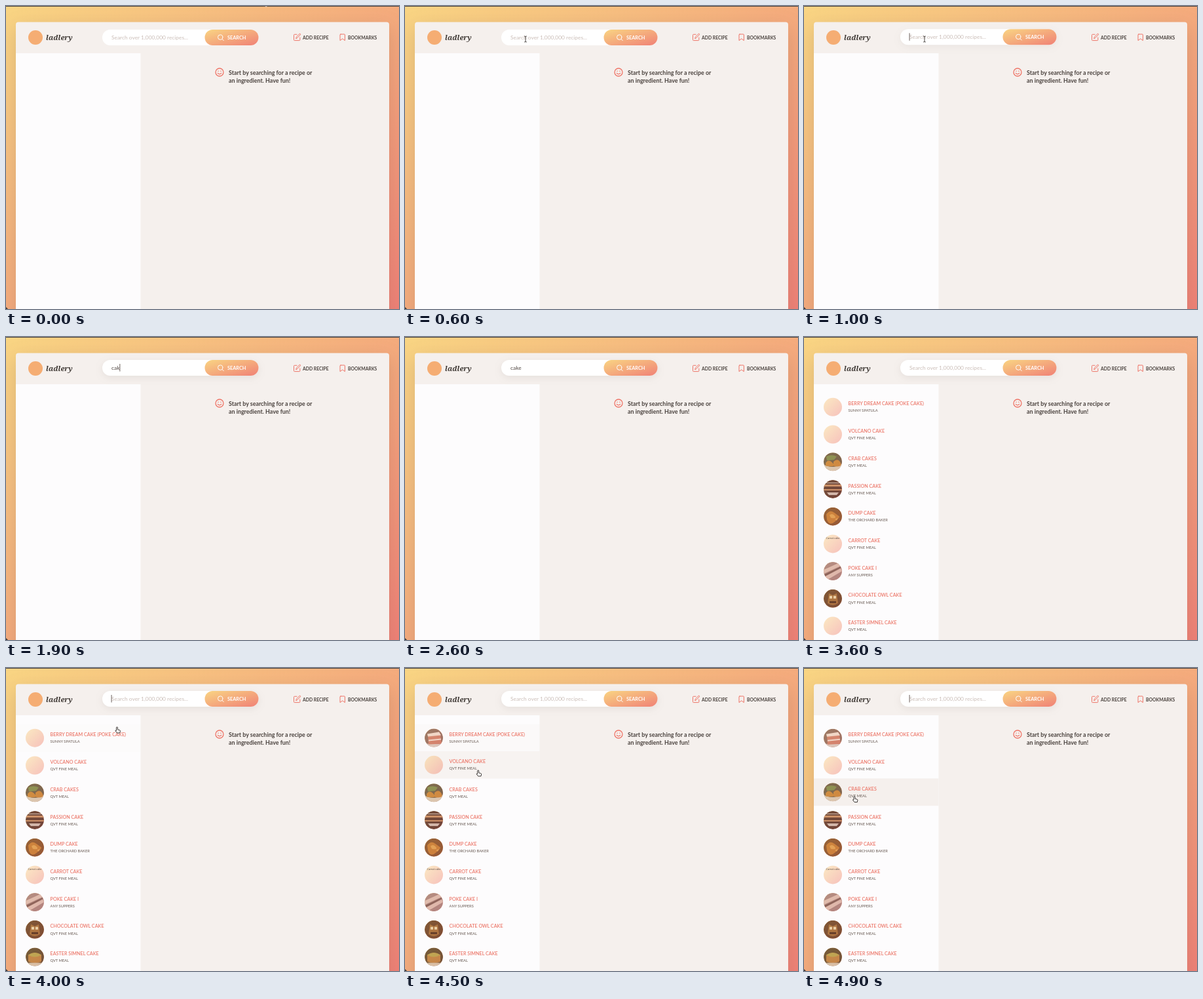
Write an HTML page that moves like this. It is 600 by 462 pixels and loops after 5000 ms.

```html
<!DOCTYPE html>
<html lang="en">
<head>
<meta charset="utf-8">
<title>Recipe search</title>
<style>
  html, body { margin: 0; width: 100%; height: 100%; overflow: hidden; }
  svg { display: block; font-family: Lato, sans-serif; }
  .card { filter: drop-shadow(0 9px 14px rgba(97, 85, 81, .2)); }
  .brand { font: italic bold 11px "Noto Serif", serif; fill: #3f3935; }
  .nav { font-size: 6.85px; font-weight: 700; fill: #4a423e; }
  .message { font-size: 8.9px; font-weight: 700; fill: #4a423e; }
  .input { font-size: 8.38px; }
  .button { font-size: 7.35px; font-weight: 700; fill: #fff; }
  .title { font-size: 7.2px; font-weight: 600; fill: #ec786a; }
  .publisher { font-size: 5.7px; font-weight: 600; fill: #7d716b; }
  .alt { font-size: 4.2px; fill: #5b4c45; text-anchor: middle; }
  .icon { fill: none; stroke: #ee7568; stroke-linecap: round; stroke-linejoin: round; }
</style>
</head>
<body>
<svg width="600" height="462" viewBox="0 0 600 462">
  <defs>
    <linearGradient id="warm" x2="1" y2="1">
      <stop stop-color="#f9d583"/><stop offset="1" stop-color="#f08176"/>
    </linearGradient>
    <clipPath id="round"><circle r="14"/></clipPath>
  </defs>

  <rect width="600" height="462" fill="url(#warm)"/>
  <rect class="card" x="15" y="24.5" width="570" height="500" rx="4" fill="#f5f0ed"/>
  <rect x="15" y="72" width="190.5" height="390" fill="#fdfcfd"/>
  <rect width="600" height="1" fill="#4b4541"/>
  <path d="M0 459v3h3z" fill="#3a3431"/>

  <circle cx="45" cy="48" r="11" fill="#f5ad73"/>
  <text class="brand" x="61" y="51.5">ladlery</text>

  <g id="search">
    <rect x="147" y="36" width="238.5" height="24" rx="12" fill="#fff"/>
    <text id="query" class="input" x="161" y="51"></text>
    <rect id="caret" y="42" width=".9" height="11.5" fill="#5c4f4a"/>
    <rect x="303.5" y="36" width="82" height="24" rx="12" fill="url(#warm)"/>
    <path class="icon" style="stroke:#fff" d="M330.9 47.6a3.7 3.7 0 1 1-7.4 0a3.7 3.7 0 1 1 7.4 0M329.9 50.3l2.4 2.4"/>
    <text class="button" x="338" y="50.7">SEARCH</text>
  </g>

  <path class="icon" d="M444 43.3h-3.5q-1 0-1 1v7.3q0 1 1 1h7.3q1 0 1-1V48M442.8 49.4l.5-2.2 4.7-4.7q.7-.5 1.3 0 .6.7 0 1.4l-4.7 4.8z"/>
  <text class="nav" x="453" y="50.5">ADD RECIPE</text>
  <path class="icon" d="M511 43h5.4q1 0 1 1v8.6l-3.7-2.7-3.7 2.7V44q0-1 1-1z"/>
  <text class="nav" x="522" y="50.5">BOOKMARKS</text>

  <g class="icon" stroke-width="1.3">
    <circle cx="326" cy="101" r="6"/>
    <path d="M323.3 102.4q2.7 3 5.4 0M324 99.2v.2M328 99.2v.2"/>
  </g>
  <text class="message" x="340" y="104.5">Start by searching for a recipe or</text>
  <text class="message" x="340" y="117.3">an ingredient. Have fun!</text>

  <g id="results"></g>
  <path id="cursor" stroke-linejoin="round"/>
</svg>

<script>
const LOOP = 5000, STEP = 100;
const FOCUS = 800, SUBMIT = 2900, FADE = 300;
const TYPED = [1400, 1600, 1800, 2000];
const NEVER = Infinity;

// Photos are a ground colour followed by [path, colour] pairs.
const recipes = [
  { title: 'BERRY DREAM CAKE (POKE CAKE)', by: 'SUNNY SPATULA', load: 4500, hover: [3966, 4282],
    photo: ['#8f6b5f', ['M-14 9H14V14H-14z', '#d9cdc6'], ['M-9-3L10-5 12 9-8 10z', '#cf7f6c'],
      ['M-10-6L8-9 11-4-9-2zM-8 3L11 1V3L-8 5z', '#f0ddd3']] },
  { title: 'VOLCANO CAKE', by: 'QVT FINE MEAL', load: NEVER, hover: [4282, 4600] },
  { title: 'CRAB CAKES', by: 'QVT MEAL', load: 3400, hover: [4600, NEVER],
    photo: ['#6a5b45', ['M-14 4Q0 12 14 3V14H-14z', '#d8cdb8'], ['M-10-8Q-2-12 6-8L2-3-9-2z', '#7d8b4c'],
      ['M-11 2Q-7-5-1 1T-2 7-11 6zM1 0Q7-6 11 0T9 7 1 6z', '#c98637']] },
  { title: 'PASSION CAKE', by: 'QVT FINE MEAL', load: 3300,
    photo: ['#5d382f', ['M-14-7H14V-4H-14zM-14 0H14V2H-14z', '#c58a63'],
      ['M-9 5H9L6 9H-6zM-14-10H14V-9H-14z', '#cdbab2']] },
  { title: 'DUMP CAKE', by: 'THE ORCHARD BAKER', load: 3500,
    photo: ['#87502a', ['M-10-3Q-5-11 2-6T10 0 3 8-9 5z', '#c67a31'],
      ['M-5-2Q-1-6 3-1T-3 2zM3 4L8 2 6 6z', '#e0a04f']] },
  { title: 'CARROT CAKE', by: 'QVT FINE MEAL', load: NEVER, alt: 'Carrot cake' },
  { title: 'POKE CAKE I', by: 'ANY SUPPERS', load: 3400,
    photo: ['#a98280', ['M-14-2L8-12 12-8-14 4zM-12 8L12-4 14 0-8 13z', '#dcbcb4'],
      ['M-13 5L12-7V-5L-12 8z', '#7b5652']] },
  { title: 'CHOCOLATE OWL CAKE', by: 'QVT FINE MEAL', load: 3600,
    photo: ['#6b4228', ['M-6-8L0-5 6-8 8 7Q0 13-8 7z', '#a26c37'],
      ['M-5-4h4v4h-4zM1-4h4v4h-4z', '#ead6ae'], ['M-5 4H5V7H-5z', '#4b2b1b']] },
  { title: 'EASTER SIMNEL CAKE', by: 'QVT MEAL', load: 3700,
    photo: ['#60482c', ['M-10-3Q0-10 10-3V7Q0 12-10 7z', '#bd8140'],
      ['M-10-3Q0-10 10-3 0 3-10-3z', '#b6a24b'], ['M-14 9H14V14H-14z', '#d5c5ad']] },
];

const pointers = {
  arrow: ['M0 0v9l2.2-2 1.4 3.2 1.5-.6-1.4-3.1h3z', '#111', '#fff', .7],
  beam: ['M-1.8-4.5Q0-4.5 0-3.5V3.5Q0 4.5-1.8 4.5M1.8-4.5Q0-4.5 0-3.5M0 3.5Q0 4.5 1.8 4.5', 'none', '#332d2a', .9],
  hand: ['M-1 1Q-1 0 0 0T1 1V4L4 4.7Q5 5 4.9 6L4.3 9H0L-2.5 5.8Q-2.6 4.7-1 5.4z', '#fff', '#26211f', .9],
};

// time, x, y
const route = [[0, 393, -9], [400, 184, 50.5], [3700, 184, 50.5], [4000, 169.5, 90], [4800, 77, 195.5], [LOOP, 77, 195.5]];

const $ = id => document.getElementById(id);
const ramp = (t, start, length) => Math.min(1, Math.max(0, (t - start) / length));
const show = (node, visible) => node.setAttribute('visibility', visible ? 'inherit' : 'hidden');
const set = (node, attrs) => { for (const name in attrs) node.setAttribute(name, attrs[name]); };

const photoMarkup = ([ground, ...shapes] = []) => ground ? `<g class="photo" clip-path="url(#round)">
  <circle r="14" fill="${ground}"/>${shapes.map(([d, fill]) => `<path d="${d}" fill="${fill}"/>`).join('')}
  <circle r="14" fill="url(#warm)" opacity=".15"/></g>` : '';

$('results').innerHTML = recipes.map(({ title, by, photo, alt }) => `<g class="row">
  <rect class="hover" x="15" y="-20.8" width="190.5" height="41.7" fill="#f5f0ed"/>
  <g transform="translate(44)">
    <circle r="14" fill="url(#warm)" opacity=".48"/>
    ${alt ? `<g clip-path="url(#round)"><text class="alt" y="-7.8">${alt}</text></g>` : ''}
    ${photoMarkup(photo)}
  </g>
  <text class="title" x="67.5" y="-2.4">${title}</text>
  <text class="publisher" x="67.5" y="7.7">${by}</text></g>`).join('');

const rows = [...document.querySelectorAll('.row')].map((node, i) => ({
  ...recipes[i], node, y: 106.8 + 41.72 * i,
  shade: node.querySelector('.hover'), picture: node.querySelector('.photo'),
}));

function drawSearch(t) {
  const focus = ramp(t, FOCUS, FADE);
  $('search').setAttribute('transform', `translate(0 ${-focus})`);
  $('search').style.filter = `drop-shadow(0 3.3px 6px rgba(97, 85, 81, ${.1 * focus}))`;

  const count = t < SUBMIT ? TYPED.filter(time => time <= t).length : 0;
  const query = $('query');
  query.textContent = count ? 'cake'.slice(0, count) : 'Search over 1,000,000 recipes...';
  query.setAttribute('fill', count ? '#4f4540' : '#cbbeb8');

  const lastInput = Math.max(...[FOCUS, ...TYPED, SUBMIT].filter(time => time <= t));
  show($('caret'), t >= FOCUS && (t - lastInput) % 1000 < 500);
  $('caret').setAttribute('x', 160.6 + (count ? query.getComputedTextLength() + .4 : 0));
}

function drawResults(t) {
  show($('results'), t >= SUBMIT);
  for (const { node, y, shade, picture, load, hover } of rows) {
    const lift = hover ? ramp(t, hover[0], FADE) - ramp(t, hover[1], FADE) : 0;
    node.setAttribute('transform', `translate(0 ${y - lift})`);
    shade.setAttribute('opacity', lift);
    if (picture) show(picture, t >= load);
  }
}

function drawCursor(t) {
  const next = route.findIndex(point => point[0] > t);
  const [t0, x0, y0] = route[next - 1], [t1, x1, y1] = route[next];
  const k = (t - t0) / (t1 - t0), x = x0 + (x1 - x0) * k, y = y0 + (y1 - y0) * k;
  const kind = y > 85.5 ? 'hand' : y > 36 && y < 60 ? 'beam' : 'arrow';
  const [d, fill, stroke, width] = pointers[kind];
  set($('cursor'), { d, fill, stroke, 'stroke-width': width, transform: `translate(${x} ${y})` });
  show($('cursor'), t < TYPED[0] || t >= 3700);
}

function frame() {
  const t = Math.floor(performance.now() % LOOP / STEP) * STEP;
  drawSearch(t);
  drawResults(t);
  drawCursor(t);
  requestAnimationFrame(frame);
}
frame();
</script>
</body>
</html>
```
